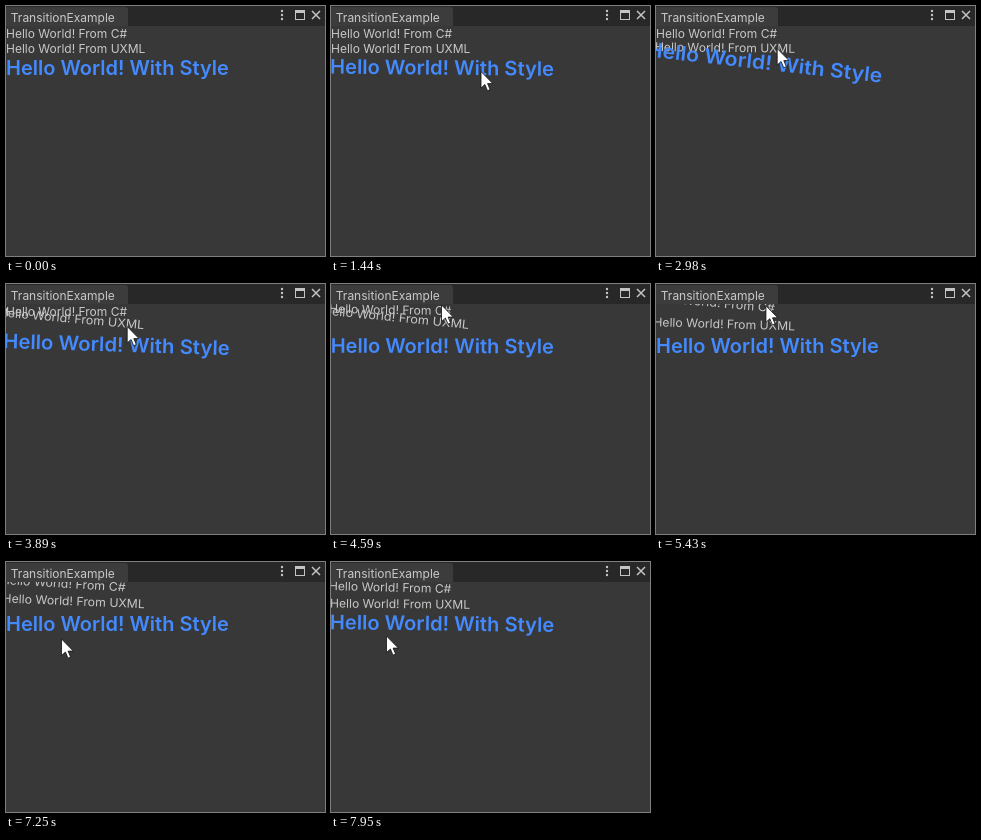
These frames come from a looping animation (319 px wide and 250 px high, 8000 ms). An HTML page:

```html
<!DOCTYPE html>
<html lang="en">
<head>
<meta charset="utf-8">
<title>TransitionExample</title>
<style>
  html, body { margin: 0; width: 100%; height: 100%; overflow: hidden; background: #383838; }
  svg { display: block; width: 100%; height: 100%; }
  text { font: 12px Inter, sans-serif; fill: #c8c8c8; white-space: pre; }
  #styled { font-size: 20px; font-weight: 600; fill: #448aff; }
</style>
</head>
<body>
<svg viewBox="0 0 319 250">
  <defs><clipPath id="panel"><rect y="20" width="319" height="230"/></clipPath></defs>
  <rect width="319" height="250" fill="#383838"/>
  <rect width="319" height="20" fill="#282828"/>
  <path d="M0 20V1H119Q122 1 122 4V20Z" fill="#3c3c3c"/>
  <text x="4.8" y="16">TransitionExample</text>
  <g fill="#c4c4c4">
    <circle cx="276" cy="5" r="1.2"/>
    <circle cx="276" cy="9" r="1.2"/>
    <circle cx="276" cy="13" r="1.2"/>
    <path d="M289 4H299V14H289ZM290 7V13H298V7Z" fill-rule="evenodd"/>
    <path d="M306 5L314 13M314 5L306 13" stroke="#c4c4c4" stroke-width="1.5"/>
  </g>
  <g clip-path="url(#panel)">
    <text id="first" y="32">Hello World! From C#</text>
    <text id="second" y="47">Hello World! From UXML</text>
    <text id="styled" y="69.2">Hello World! With Style</text>
  </g>
  <path id="cursor" d="M0 0V16.6L3.9 13L6.5 19.2L9.1 18.1L6.6 12.1H11.8Z"
        fill="#fff" stroke="#111" stroke-width=".8" stroke-linejoin="round"/>
</svg>
<script>
  const LOOP = 8000, START = 670, STEP = 70, CENTER = 159.5;
  const RISE = 0.0048;  // degrees per ms while hovered
  const FALL = 2100;    // ms to ease back to level
  const LAG = 100;      // the pointer settles this long after entering a label

  const $ = id => document.getElementById(id);
  const cursor = $('cursor');
  const labels = [['first', 27.5], ['second', 42.5], ['styled', 62.5]]
    .map(([id, y]) => ({ id, y, el: $(id) }));

  // Pointer stops: when it enters a label, where it rests, how long it travels
  const stops = [
    { t: START - LAG, x: 296, y: 236, travel: 1 },
    { t: 1320, over: 'styled', x: 150, y: 65.5, travel: 750 },
    { t: 2840, over: 'second', x: 121.2, y: 42.5, travel: 450 },
    { t: 4350, over: 'first', x: 110.5, y: 21, travel: 450 },
    { t: 5600, over: 'second', x: 90, y: 46, travel: 300 },
    { t: 6500, over: 'first', x: 74, y: 27, travel: 400 },
    { t: 7020, x: 55.5, y: 77, travel: 500 },
    { t: 7800, over: 'styled', x: 55.5, y: 74, travel: 300 }
  ];

  const clamp = v => Math.min(1, Math.max(0, v));
  const smooth = v => v * v * (3 - 2 * v);

  // Hovering turns a label steadily; leaving lets it ease out to zero
  function angle(id, t) {
    let base = 0, since = 0, on = false;
    const value = now => on
      ? Math.min(10, base + RISE * (now - since))
      : base * clamp(1 - (now - since) / FALL) ** 2;
    for (const s of stops) {
      const hover = s.over === id;
      if (s.t > t || hover === on) continue;
      base = value(s.t);
      since = s.t;
      on = hover;
    }
    return value(t);
  }

  function pointer(t) {
    let { x, y } = stops[0];
    for (const s of stops) {
      const k = smooth(clamp((t - s.t - LAG) / s.travel + 1));
      x += (s.x - x) * k;
      y += (s.y - y) * k;
    }
    return [x, y];
  }

  function draw(ms) {
    const t = ms < START ? 0 : START + Math.floor((ms - START) / STEP) * STEP;
    for (const { id, y, el } of labels) {
      const a = angle(id, t);
      el.setAttribute('transform',
        `translate(${CENTER} ${y}) rotate(${a}) scale(${1 + a / 100} 1) translate(${-CENTER} ${-y})`);
    }
    cursor.setAttribute('visibility', t < START ? 'hidden' : 'visible');
    cursor.setAttribute('transform', `translate(${pointer(t)})`);
  }

  const begin = performance.now();
  function tick() {
    draw((performance.now() - begin) % LOOP);
    requestAnimationFrame(tick);
  }
  tick();
</script>
</body>
</html>
```
